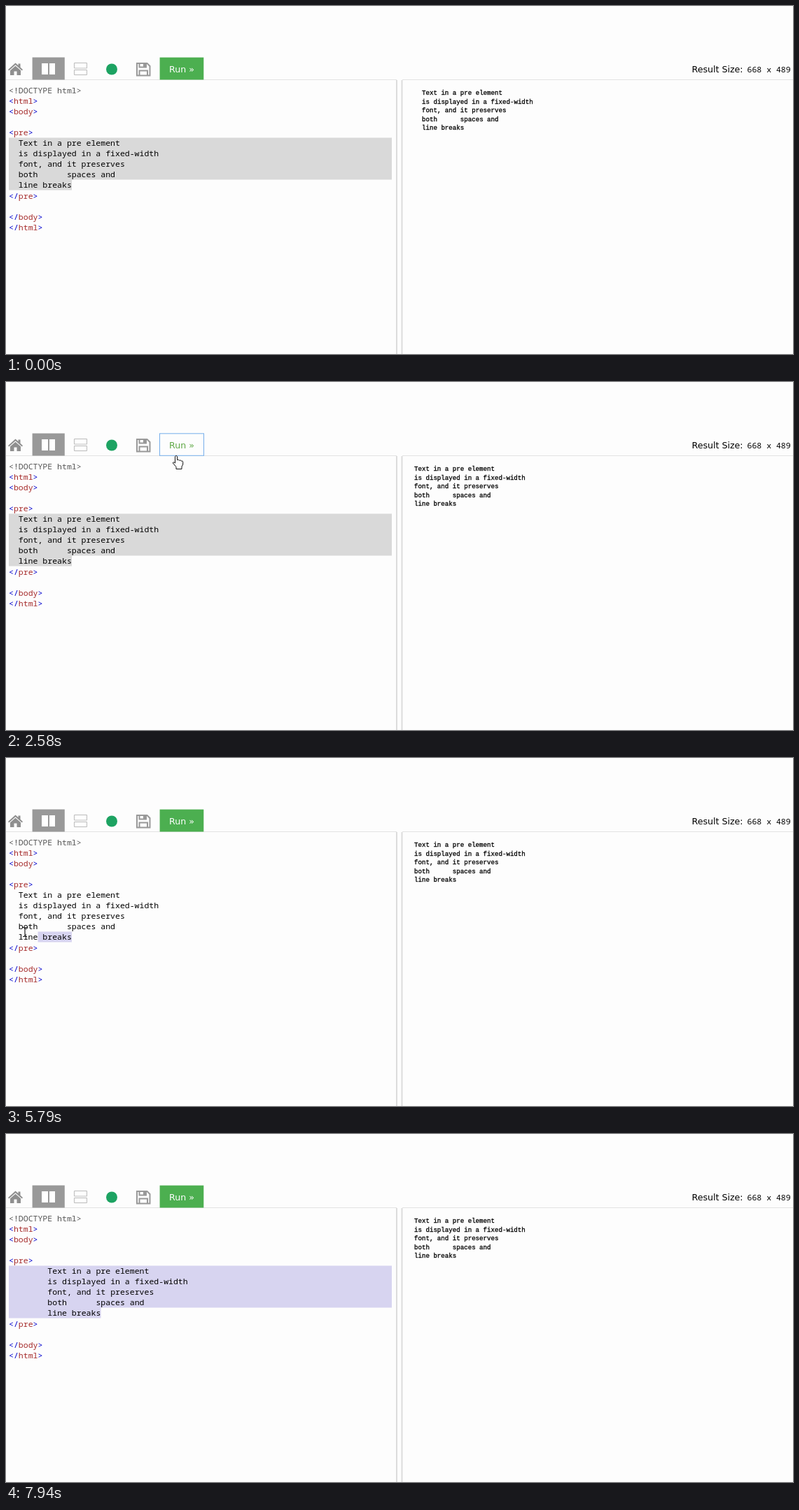
These frames come from a looping animation (1124 px wide and 498 px high, 8 s). An HTML page:

```html
<!DOCTYPE html>
<html lang="en">
<head>
<meta charset="utf-8">
<title>Code editor</title>
<style>
html, body { margin: 0; width: 100%; height: 100%; overflow: hidden; background: #fdfdfd; }
svg { display: block; width: 1124px; height: 498px; }
text { white-space: pre; }

.mono { font: 11.53px "Noto Sans Mono", monospace; }
.ui { font: 12.6px "DejaVu Sans", sans-serif; }
.result { font: 9.13px "Liberation Mono", monospace; stroke: #000; stroke-width: .3px; }
.b { fill: #0000cd; }
.t { fill: #a52a2a; }

/* One 8 s clock: 1% = 80 ms */
.move { animation: 8s linear infinite; }
.jump { animation: 8s step-end infinite; }

#button { animation-name: button; }
#label { animation-name: label; }
#focus { animation-name: focus; }
#output { animation-name: output; }
#selection { animation-name: selection; }
#block { animation-name: indent; }
#pointer { animation-name: travel; }
#shown { animation-name: shown; }
#hand { animation-name: hand; }
#beam { animation-name: beam; }

@keyframes button {
  0%, 8.375% { fill: #4caf50; animation-timing-function: ease; }
  11.875%, 32.5% { fill: #fdfdfd; animation-timing-function: ease; }
  36.25%, 100% { fill: #4caf50; }
}
@keyframes label {
  0%, 8.375% { fill: #fff; animation-timing-function: ease; }
  11.875%, 32.5% { fill: #5fa845; animation-timing-function: ease; }
  36.25%, 100% { fill: #fff; }
}
@keyframes focus {
  0% { opacity: 0; }
  15.25% { opacity: 1; }
  63.25%, 100% { opacity: 0; }
}
@keyframes output {
  0% { transform: none; opacity: 1; }
  17.625% { transform: none; opacity: 0; }
  18.25%, 100% { transform: translateX(-11px); opacity: 1; }
}
@keyframes indent {
  0% { transform: none; }
  91.625% { transform: translateX(13.84px); }
  95.75% { transform: translateX(27.68px); }
  99.25%, 100% { transform: translateX(41.52px); }
}
@keyframes selection {
  0% { fill: #d9d9d9; d: path("M4 189H551V249H94V264H4z"); }
  63.25% { fill: #d7d4f0; d: path("M94 249H94V264H94z"); }
  70.5% { fill: #d7d4f0; d: path("M87 249H94V264H87z"); }
  71% { fill: #d7d4f0; d: path("M73.2 249H94V264H73.2z"); }
  71.5% { fill: #d7d4f0; d: path("M59.4 249H94V264H59.4z"); }
  72.125% { fill: #d7d4f0; d: path("M45.5 249H94V264H45.5z"); }
  72.75% { fill: #d7d4f0; d: path("M24.8 234H551V249H94V264H4V249H24.8z"); }
  73.25% { fill: #d7d4f0; d: path("M17.8 234H551V249H94V264H4V249H17.8z"); }
  73.875% { fill: #d7d4f0; d: path("M10.9 219H551V249H94V264H4V234H10.9z"); }
  74.75% { fill: #d7d4f0; d: path("M4 219H551V249H94V264H4z"); }
  75.375% { fill: #d7d4f0; d: path("M4 204H551V249H94V264H4z"); }
  77.125% { fill: #d7d4f0; d: path("M4 189H551V249H94V264H4z"); }
  91.625% { fill: #d7d4f0; d: path("M4 189H551V249H107.8V264H4z"); }
  95.75% { fill: #d7d4f0; d: path("M4 189H551V249H121.7V264H4z"); }
  99.25%, 100% { fill: #d7d4f0; d: path("M4 189H551V249H135.5V264H4z"); }
}
@keyframes travel {
  0%, 4.125% { transform: translate(322px, 492px); }
  5.6% { transform: translate(322px, 350px); }
  7.2% { transform: translate(316px, 200px); }
  8% { transform: translate(297px, 135px); }
  8.5% { transform: translate(278px, 106px); }
  10.25% { transform: translate(253px, 93px); }
  11.5%, 32.2% { transform: translate(252px, 93px); }
  32.25%, 32.6% { transform: translate(243px, 106px); }
  34.4% { transform: translate(195px, 170px); }
  36.3% { transform: translate(148px, 230px); }
  38.5%, 63.25% { transform: translate(116px, 262px); }
  64.75%, 66.625% { transform: translate(112px, 263px); }
  69.5% { transform: translate(95px, 260px); }
  72.375%, 72.6% { transform: translate(27px, 249px); }
  75.375%, 100% { transform: translate(6px, 212px); }
}
@keyframes shown {
  0% { opacity: 0; }
  4.125% { opacity: 1; }
  75.375%, 100% { opacity: 0; }
}
@keyframes hand {
  0% { opacity: 0; }
  8.5% { opacity: 1; }
  32.65%, 100% { opacity: 0; }
}
@keyframes beam {
  0% { opacity: 1; }
  8.5% { opacity: 0; }
  32.65%, 100% { opacity: 1; }
}
</style>
</head>
<body>
<svg viewBox="0 0 1124 498">
  <!-- Panes -->
  <path d="M0 105.5H558M566 105.5H1124" stroke="#e2e2e2"/>
  <path d="M558 106V498M565.5 106V498" stroke="#dcdcdc" stroke-width="2"/>

  <!-- Toolbar -->
  <g fill="#8f8f8f">
    <path d="M3 91L13.5 81.5L17.5 85V82.5H20.5V87.8L24 91L22.8 92.4L13.5 84.2L4.2 92.4z"/>
    <path d="M6 92.2L13.5 85.7L21 92.2V99H15.5V93.5H11.5V99H6z"/>
  </g>
  <path d="M37.6 73.6H83.8V105.5H37.6z" fill="#999"/>
  <path d="M51 82H60V98H51zM62 82H70V98H62z" fill="#fff"/>
  <path d="M97.5 81.5H115.5V89H97.5zM97.5 91.5H115.5V98.5H97.5z" fill="#fff" stroke="#bbb"/>
  <circle cx="151" cy="90.5" r="8" fill="#1da362"/>
  <g fill="none" stroke="#999" stroke-width="2">
    <path d="M187 82H201.5L205.5 86V99.5H187z"/>
    <path d="M190.5 82V87.5H200V82M190.5 99V92.5H202V99"/>
  </g>
  <path d="M196 82H199V87H196z" fill="#999"/>
  <rect id="button" class="move" x="219.6" y="73.6" width="62.7" height="31.9" fill="#4caf50"/>
  <rect id="focus" class="jump" x="219.5" y="73.8" width="63" height="31.5" fill="none" stroke="#75aeea"/>
  <text id="label" class="ui move" x="251" y="95" text-anchor="middle" fill="#fff">Run »</text>
  <text class="ui" x="979.5" y="95">Result Size:</text>
  <text class="mono" x="1058.5" y="95">668 x 489</text>

  <!-- Editor -->
  <g transform="translate(0 -.4)">
    <path id="selection" class="jump" d="M4 189H551V249H94V264H4z" fill="#d9d9d9"/>
  </g>
  <g class="mono">
    <text x="4" y="125" fill="#555">&lt;!DOCTYPE html&gt;</text>
    <text x="4" y="140" class="b">&lt;<tspan class="t">html</tspan>&gt;</text>
    <text x="4" y="155" class="b">&lt;<tspan class="t">body</tspan>&gt;</text>
    <text x="4" y="185" class="b">&lt;<tspan class="t">pre</tspan>&gt;</text>
    <g id="block" class="jump">
      <text x="17.8" y="200">Text in a pre element</text>
      <text x="17.8" y="215">is displayed in a fixed-width</text>
      <text x="17.8" y="230">font, and it preserves</text>
      <text x="17.8" y="245">both      spaces and</text>
      <text x="17.8" y="260">line breaks</text>
    </g>
    <text x="4" y="276" class="b">&lt;/<tspan class="t">pre</tspan>&gt;</text>
    <text x="4" y="306" class="b">&lt;/<tspan class="t">body</tspan>&gt;</text>
    <text x="4" y="321" class="b">&lt;/<tspan class="t">html</tspan>&gt;</text>
  </g>

  <!-- Result -->
  <g id="output" class="result jump">
    <text x="594" y="127">Text in a pre element</text>
    <text x="594" y="140">is displayed in a fixed-width</text>
    <text x="594" y="152">font, and it preserves</text>
    <text x="594" y="165">both      spaces and</text>
    <text x="594" y="177">line breaks</text>
  </g>

  <!-- Pointer -->
  <g id="shown" class="jump">
    <g id="pointer" class="move">
      <path id="beam" class="jump" d="M-3-6.5H-1L0-5.5L1-6.5H3M0-5.5V5.5M-3 6.5H-1L0 5.5L1 6.5H3" fill="none" stroke="#222" stroke-width="1.2"/>
      <path id="hand" class="jump" d="M-1.5 10V.5Q0-2 1.5 .5V5.5Q3.5 4.5 4.5 6.2Q6.5 5.4 7.3 7Q9.5 6.4 9.7 8.5V12L8 15V18.5H0V15.5L-4.6 10Q-4.5 7.5-1.5 10z" fill="#fff" stroke="#111" stroke-linejoin="round"/>
    </g>
  </g>
</svg>
</body>
</html>
```
